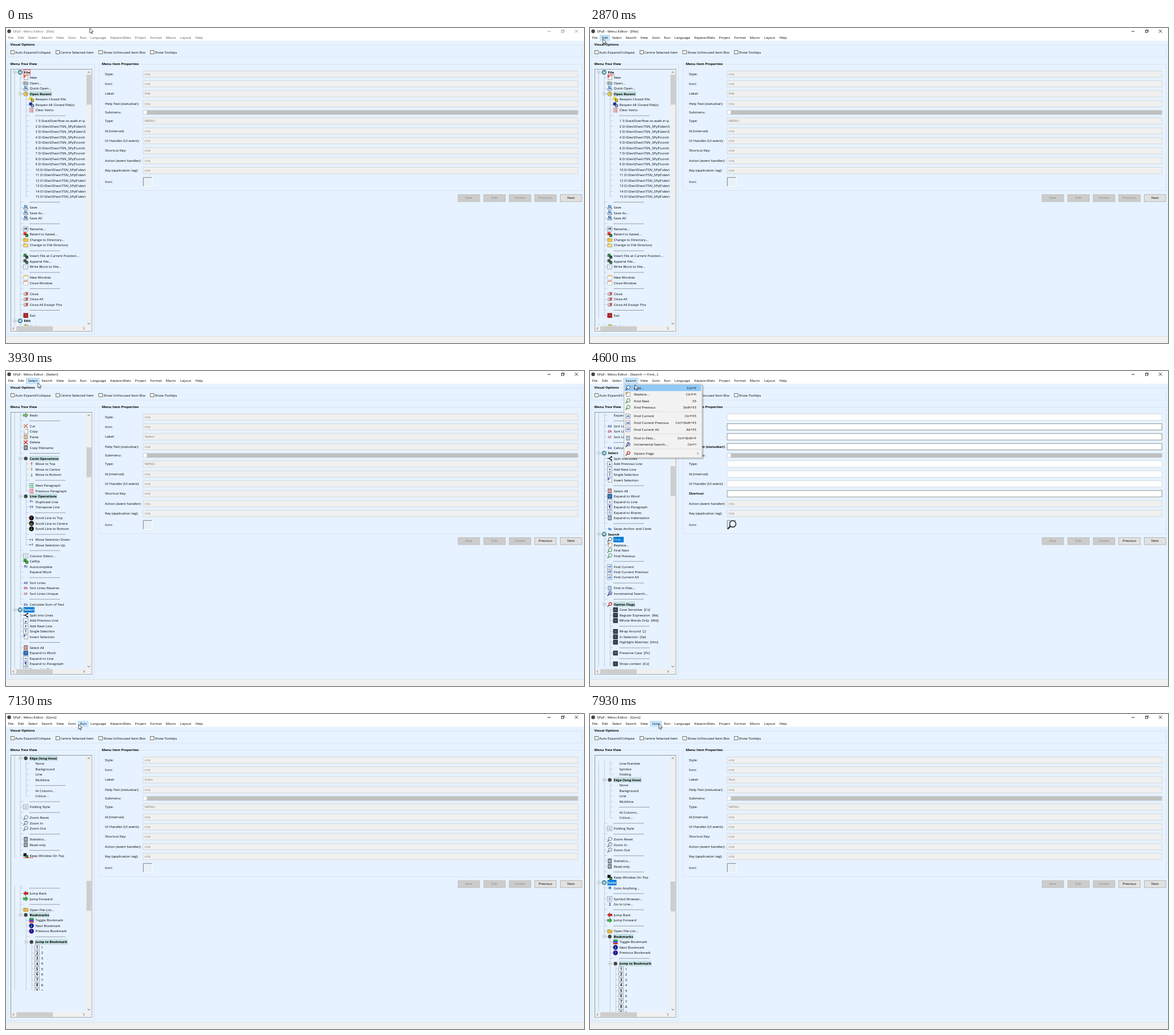
An HTML page with a canvas for the animation above (8000 ms loop, 1012 by 553 pixels).

```html
<!DOCTYPE html>
<html lang="en">
<head>
<meta charset="utf-8">
<title>Menu Editor</title>
<style>
html, body { margin: 0; width: 100%; height: 100%; overflow: hidden; background: #e6f2ff; }
canvas { display: block; width: 1012px; height: 553px; }
</style>
</head>
<body>
<canvas id="stage"></canvas>
<script>
const W = 1012, H = 553, LOOP = 8000;
const BG = '#e6f2ff', BLUE = '#0078d7';
const canvas = document.getElementById('stage');
const dpr = window.devicePixelRatio || 1;
canvas.width = W * dpr;
canvas.height = H * dpr;
const c = canvas.getContext('2d');
c.scale(dpr, dpr);

// ---- basic helpers ----
function box(x, y, w, h, fill, stroke, lw = 0.8) {
  if (fill) { c.fillStyle = fill; c.fillRect(x, y, w, h); }
  if (stroke) {
    c.strokeStyle = stroke;
    c.lineWidth = lw;
    c.strokeRect(x + lw / 2, y + lw / 2, w - lw, h - lw);
  }
}
function line(pts, col, lw = 0.8, dash = []) {
  c.strokeStyle = col;
  c.lineWidth = lw;
  c.setLineDash(dash);
  c.beginPath();
  pts.forEach(([x, y], i) => i ? c.lineTo(x, y) : c.moveTo(x, y));
  c.stroke();
  c.setLineDash([]);
}
function poly(pts, fill, stroke, lw = 0.6) {
  c.beginPath();
  pts.forEach(([x, y]) => c.lineTo(x, y));
  c.closePath();
  c.fillStyle = fill;
  c.fill();
  if (stroke) { c.strokeStyle = stroke; c.lineWidth = lw; c.stroke(); }
}
function disc(x, y, r, fill, stroke, lw = 0.8) {
  c.beginPath();
  c.arc(x, y, r, 0, 7);
  if (fill) { c.fillStyle = fill; c.fill(); }
  if (stroke) { c.strokeStyle = stroke; c.lineWidth = lw; c.stroke(); }
}
// Text is set ten times larger and scaled down, for exact advances at small sizes.
function setFont(bold, size) {
  c.font = `${bold ? 'bold ' : ''}${size * 10}px "Open Sans", "Noto Sans", "DejaVu Sans", sans-serif`;
}
function text(s, x, y, o = {}) {
  const { bold = false, col = '#000', align = 'left', size = bold ? 5.95 : 6.05 } = o;
  c.save();
  c.translate(x, y + size * 0.36);
  c.scale(0.1, 0.1);
  setFont(bold, size);
  c.fillStyle = col;
  c.textAlign = align;
  c.fillText(s, 0, 0);
  c.restore();
}
function widthOf(s, bold) {
  setFont(bold, bold ? 5.95 : 6.05);
  return c.measureText(s).width / 10;
}

// ---- icons, drawn around the origin in about 9 x 9 px ----
const ICONS = {
  page(col) { box(-3, -4, 7, 8, '#fff', '#888'); box(-4, -4, 3.5, 3.5, col); },
  doc(col) { box(-3.2, -4, 6.4, 8, '#f4f6f8', col, 1); for (const y of [-2, 0, 2]) line([[-2, y], [2, y]], col); },
  dir(col) { box(-4, -3, 4, 2, '#c89a20'); box(-4, -2, 8.4, 5.5, col, '#a98530', 0.6); },
  drive(col) { box(-2.5, -4, 5, 4, '#d9e9f8', col); box(-4, 0, 8, 3.5, '#dde3ea', '#63788f'); line([[-2, -3], [2, 1]], col, 1.2); },
  clock(col) { disc(0, 0, 3.8, col, '#7d7440'); line([[0, -2.4], [0, 0], [2, 1]], '#333'); },
  list(col) { for (const y of [-3, 0, 3]) { box(-3.5, y - 0.7, 1.6, 1.5, col); box(-1, y - 0.6, 4.6, 1.2, col); } },
  box(col, s) { box(-4.2, -4.2, 8.4, 8.4, '#edf4fb', '#778', 0.6); glyph(s, col, 6.4); },
  sq(col, s) { box(-4.2, -4.2, 8.4, 8.4, col); glyph(s, '#8a98a8', 4.5); },
  ball(col, s, ink = '#fff') { disc(0, 0, 4.2, col); glyph(s, ink, 6); },
  chr(col, s) { glyph(s, col, 7.6); },
  lens(col, s = '') {
    line([[-4, 4], [-1.2, 1]], col, 1.4);
    disc(0.8, -0.8, 3, '#eef7ff', col, 0.9);
    c.save(); c.translate(0.8, -0.8); glyph(s, col, 4.5); c.restore();
  },
  win(col) { box(-4, -4, 8, 8, '#fafafa', '#aaa', 0.6); box(-4, -4, 8, 1.6, col); },
  arrow(col, turn) {
    c.rotate(turn * Math.PI / 2);
    poly([[-4.2, 0], [0, -4], [0, -1.8], [4.2, -1.8], [4.2, 1.8], [0, 1.8], [0, 4]], col, '#444', 0.5);
  },
  cross(col) { line([[-3.4, -3], [3.4, 3.4]], col, 1.4); line([[3.4, -3.6], [-3.4, 3.4]], col, 1.4); },
  closer(col) { box(-3.4, -2, 6, 5, '#ddd', '#888'); line([[0, -3], [4, 2]], col, 1.2); line([[4, -3], [0, 2]], col, 1.2); },
  stack(colA, colB) { box(-4, -4, 5.5, 5.5, colA); box(-0.5, -0.5, 4.7, 4.7, colB, '#111', 0.6); },
  mark(col) { disc(0, 0, 3.2, col); },
  gear(col) { disc(1, -0.8, 2.4, '#fff', col, 1.4); line([[-4, 4], [-1, 1]], '#456', 1.4); },
  share(col) { line([[-4, 0], [-1, 0], [3, -3]], col, 1.2); line([[-1, 0], [3, 3]], col, 1.2); disc(3, -2.8, 1.2, col); disc(3, 2.8, 1.2, col); },
  pills() { box(-4, -4, 8, 2.4, '#1a9a2a'); box(-4, -1.2, 8, 2.4, '#2233cc'); box(-4, 1.6, 8, 2.4, '#d22'); }
};
function glyph(s, col, size) {
  if (s) text(s, 0, 0, { bold: true, col, align: 'center', size: s.length > 1 ? size * 0.72 : size });
}
function icon(spec, x, y, k = 1) {
  const [kind, ...args] = spec.split(' ');
  c.save();
  c.translate(x, y);
  c.scale(k, k);
  ICONS[kind](...args);
  c.restore();
}

// ---- tree: indent is depth, "+" a parent, "-" a separator, "@" an icon, "#" a row number ----
const PATH = String.raw`D:\Dev\D\wx\TSN_SPyE` + '\\';
const recent = Array.from({ length: 15 }, (_, i) => {
  const tail = i < 1 ? '3-StackOverflow-os-walk-in-p' : PATH + (i < 3 ? 'dev\\S' : i < 9 ? 'contr' : 'dev\\');
  return `  ${i + 1} ${tail}`;
}).join('\n');
const digits = (a, b) => Array.from({ length: b - a + 1 }, (_, i) => `   ${a + i}@box #111 ${a + i}`).join('\n');
const TREE = `#0
+File
 New@page #e8502a
 Open...@dir #8fb4dc
 Quick Open...@drive #3a78b8
 +Open Recent@clock #f3dc6a
  Reopen Closed File@stack #f0d020 #e8c840
  Reopen All Closed File(s)@stack #30309a #8aa8e8
  Clear Items@list #d03030
  -
${recent}
 -
 Save@drive #3a78b8
 Save As...@drive #3a78b8
 Save All@drive #2a5a98
 -
 Rename...@box #222 ab
 Revert to Saved...@stack #e03030 #28a040
 Change to Directory...@dir #f5c948
 Change to File Directory@dir #f3dc9a
 -
 Insert File at Current Position...@stack #2e8a4a #444c58
 Append File...@stack #555 #3e8a5a
 Write Block to File...@box #789 ::
 -
 New Window@win #f0b050
 Close Window@win #e08060
 -
 Close@closer #d02020
 Close All@closer #c02020
 Close All Except This@closer #c02020
 -
 Exit@sq #a82020 o
+Edit
 Undo@arrow #f0d040 0
 Redo@arrow #70c060 2
 -
 Cut@cross #d87050
 Copy@page #e8ebf0
 Paste@doc #a87838
 Delete@cross #d82020
 Copy Filename@doc #222
 -
 +Caret Operations@mark #444
  Move to Top@chr #e02020 ↑
  Move to Centre@chr #d89020 ↕
  Move to Bottom@chr #28a030 ↓
  -
  Next Paragraph@list #20983a
  Previous Paragraph@list #e03030
 +Line Operations@mark #444
  Duplicate Line@chr #1c3c9c T=
  Transpose Line@chr #1c3c9c TT
  -
  Scroll Line to Top@ball #111 ↑ #f33
  Scroll Line to Centre@ball #111 ↔ #fd4
  Scroll Line to Bottom@ball #111 ↓ #4d4
  -
  Move Selection Down@chr #222 =↓
  Move Selection Up@chr #222 =↑
 -
 Column Editor...@box #3a78b8 ¦¦
 Calltip@stack #28a030 #58c040
 Autocomplete@chr #1c2c5c f()
 Expand Word
 -
 Sort Lines@chr #2848a8 AZ
 Sort Lines Reverse@chr #a82848 ZA
 Sort Lines Unique@chr #a83838 U!
 -
 Calculate Sum of Text@chr #1c3c9c Σn
+Select
 Split into Lines@share #111
 Add Previous Line@box #1c3c6c ▴
 Add Next Line@box #1c3c6c ▾
 Single Selection@box #1c3c6c I
 Invert Selection@page #5878c8
 -
 Select All@doc #843838
 Expand to Word@sq #3468a8 ab
 Expand to Line@box #3468a8 =
 Expand to Paragraph@box #1c3c9c ¶
 Expand to Braces@box #3468a8 {}
 Expand to Indentation@doc #3c5878
 -
 Swap Anchor and Caret@chr #2868b8 ⇆
+Search
 Find...@lens #345
 Replace...@page #c89858
 Find Next@lens #287838
 Find Previous@lens #287838
 -
 Find Current@box #2868b8 ab
 Find Current Previous@box #2848a8 ab
 Find Current All@box #2868b8 ab
 -
 Find in Files...@doc #6888b8
 Incremental Search...@lens #1c2c6c A
 -
 +Option Flags@gear #c83838
  Case Sensitive  [Cs]@sq #343a44 Aa
  Regular Expression  [Re]@sq #343a44 .*
  Whole Words Only  [Wd]@sq #343a44 ab
  -
  Wrap Around  [;]@sq #343a44 ↺
  In Selection  [Se]@sq #343a44 =
  Highlight Matches  [Hm]@sq #343a44 =
  -
  Preserve Case  [Pc]@sq #343a44 AB
  -
  Show context  [Cx]@sq #343a44 =
#169
  Tab width: 6@box #c02828 6
  Tab width: 7@box #c02828 7
#190
  Line Number
  Symbol
  Folding
 +Edge (long lines)@mark #444
  None
  Background
  Line
  Multiline
  -
  At Column...
  Colour...
 -
 Folding Style@box #556 ||
 -
 Zoom Reset@lens #567
 Zoom In@lens #567 +
 Zoom Out@lens #567 -
 -
 Statistics...@doc #343a44
 Read-only@doc #343a44
 -
 Keep Window On Top@stack #111 #28a030
+Goto
 Goto Anything...@chr #2878a8 ✱
 -
 Symbol Browser...@box #3868a8 {}
 Go to Line...@chr #1c3c9c ↧
 -
 Jump Back@arrow #e02020 0
 Jump Forward@arrow #28c030 2
 -
 Open File List...@dir #e8b848
 +Bookmarks@mark #444
  Toggle Bookmark@pills
  Next Bookmark@ball #1a1a9c ↓ #4e4
  Previous Bookmark@ball #1a1a9c ↑ #f44
  -
  +Jump to Bookmark@mark #444
${digits(1, 10)}
  Clear Bookmarks@cross #d82020
+Run
 Run`;

const rows = [];
let at = 0;
for (const s of TREE.split('\n')) {
  if (s[0] === '#') { at = +s.slice(1); continue; }
  const body = s.trimStart(), parent = body[0] === '+';
  const [label, ic] = body.slice(parent ? 1 : 0).split('@');
  rows[at++] = { depth: s.length - body.length, parent, label, ic };
}
const PITCH = 9.487, TOP = 77.7, GOTO = 212;
const rowOf = name => rows.findIndex(r => r && r.parent && r.label === name);

// True when a sibling at this level follows.
function continues(i, level) {
  let j = i + 1;
  while (rows[j] && rows[j].depth > level) j++;
  return !rows[j] || rows[j].depth === level;
}
function drawRow(i, y, s) {
  const r = rows[i], half = PITCH / 2, col = '#b4bcc6';
  for (let l = 0; l <= r.depth; l++) {
    const x = 15.2 + 10 * l, more = continues(i, l);
    if (l === r.depth) line([[x, i ? y - half : y], [x, more ? y + half : y]], col, 0.7);
    else if (more) line([[x, y - half], [x, y + half]], col, 0.7);
  }
  const x = 15.2 + 10 * r.depth, tx = x + 16.3;
  line([[x, y], [x + 5, y]], col, 0.7);
  if (r.parent) {
    box(x - 2.6, y - 2.6, 5.2, 5.2, '#f6faff', '#a4adb8', 0.6);
    line([[x - 1.4, y], [x + 1.4, y]], '#456', 0.7);
  }
  if (r.label === '-') {
    line([[tx, y + 0.4], [tx + 52.4, y + 0.4]], '#333', 0.7, [1.7, 0.96]);
    return;
  }
  if (r.parent && !r.depth) {
    disc(x + 9.6, y, 4.2, '#4a8797');
    text('M', x + 9.6, y, { bold: true, size: 5.6, align: 'center', col: '#fff' });
  } else if (r.ic) icon(r.ic, x + 9.4, y);
  const w = widthOf(r.label, r.parent) + 1.4, chosen = i === s.sel;
  if (chosen) box(tx - 0.8, y - 4.7, w, PITCH, BLUE);
  else if (r.parent && r.depth) box(tx - 0.6, y - 4.6, w, 9.1, '#c2dde0');
  if (i === s.framed) box(tx - 1, y - 4.7, w + 0.4, PITCH, '#f4f4f4', '#f03030');
  text(r.label, tx, y, { bold: r.parent, col: chosen ? '#fff' : '#000' });
}
function chevron(x, y, dx, dy) {
  line([[x - dx - dy * 2, y - dy - dx * 2], [x + dx, y + dy], [x - dx + dy * 2, y - dy + dx * 2]], '#444', 0.9);
}
function drawTree(s) {
  box(8, 72, 142.5, 461, BG, '#7d858f');
  c.save();
  c.beginPath();
  c.rect(9, 73, 132, 450);
  c.clip();
  for (let k = 0; k < 48; k++) if (rows[s.top + k]) drawRow(s.top + k, TOP + k * PITCH, s);
  for (const [a, b] of s.blank) box(9, a, 132, b - a, BG);
  if (s.red) line([[30.5, s.red[0]], [s.red[1], s.red[0]]], '#f03030', 0.9);
  c.restore();
  box(141, 73, 8.7, 450, '#f0f0f0');
  box(9, 523, 140.7, 9.2, '#f0f0f0');
  box(141, s.thumb, 8.2, 52.5, '#cdcdcd');
  box(18, 523.6, 64, 8, '#cdcdcd');
  chevron(145, 77.8, 0, -1);
  chevron(145, 518.8, 0, 1);
  chevron(13, 527.5, -1, 0);
  chevron(136.5, 527.5, 1, 0);
}

// ---- properties ----
const FIELDS = [['Style:', 81], ['Icon:', 98], ['Label:', 115.5], ['Help Text (statusbar):', 132.8],
  ['Type:', 163.3], ['Id (internal):', 180.8], ['UI Handler (UI event):', 198], ['Shortcut Key:', 215.5],
  ['Action (event handler):', 232.8], ['Key (application tag):', 250.2]];
const FIND = ['', 'find', 'Find...', 'Find text dialog in search panel', 'NORMAL', 'WindowIDRef: -31846',
  'Doc', 'Ctrl+F', 'tlw.set_search_mode', 'SCH_FND'];
const EDITABLE = [1, 2, 3, 7];

function drawProps(s) {
  FIELDS.forEach(([name, y], i) => {
    const edit = s.mode !== 'menu' && EDITABLE.includes(i);
    const white = edit || (s.mode === 'blank' && i < 8);
    let val = 'n/a';
    if (s.mode === 'menu') val = i === 2 ? s.label : i === 4 ? 'MENU' : val;
    else if (s.mode === 'find') val = FIND[i];
    else if (i < 8) val = '';
    text(s.mode === 'blank' && i === 7 ? 'Shortcut' : name, 173.3, y - 0.2, { bold: edit });
    box(239.7, y - 6, 762, 12, white ? '#fff' : '#f0f0f0', edit ? '#7a7a7a' : '#cfd3d8');
    text(val, 243, y - 0.2, { col: edit ? '#000' : '#747474' });
  });
  text('Submenu:', 173.3, 148);
  box(239.7, 144.3, 762, 7.8, '#c0c0c0');
  box(240.5, 145, 6, 6.4, '#fff');
  text('Icon:', 173.3, 270);
  box(240, 262, 16.5, 16.5, '#e9f1f8');
  line([[256, 262.4], [240.4, 262.4], [240.4, 278]], '#777', 0.9);
  line([[256.2, 262], [256.2, 278.2], [240, 278.2]], '#fff', 0.9);
  if (s.mode !== 'menu') icon('lens #2c3a48', 248.5, 270, 1.85);
}

// ---- window ----
const MENUS = [['File', 3.7], ['Edit', 21], ['Select', 38.7], ['Search', 62.3], ['View', 88], ['Goto', 108.7],
  ['Run', 129.7], ['Language', 148], ['KeywordSets', 182.7], ['Project', 225.8], ['Format', 252.5],
  ['Macro', 279.8], ['Layout', 305], ['Help', 331.5]];
const CHECKS = [['Auto Expand/Collapse', 8], ['Centre Selected Item', 87], ['Show Unfocused Item Box', 162.3], ['Show Tooltips', 252.5]];
const BUTTONS = [['New', 791], ['Edit', 836], ['Delete', 880.7], ['Previous', 925.3], ['Next', 970]];

function group(name, x, y, w, h) {
  box(x, y, w, h, null, '#d6e0ea');
  box(x + 3.5, y - 3, widthOf(name, true) + 2, 6, BG);
  text(name, x + 4.7, y, { bold: true });
}
function drawWindow(s, hover) {
  box(0, 0, W, H, BG);
  box(0, 0, W, 22.4, '#fff');
  const ink = s.active ? '#000' : '#8a8a8a';
  disc(5.5, 5.8, 3.2, '#444');
  text(`SPyE - Menu Editor - [${s.title}]`, 12.2, 5.8, { col: s.active ? '#000' : '#666' });
  line([[948, 6], [953.6, 6]], ink);
  box(972, 4, 4.4, 4.4, null, ink, 0.7);
  line([[973.4, 4], [973.4, 3], [977.4, 3], [977.4, 7], [976.4, 7]], ink, 0.6);
  line([[996, 3], [1001.4, 8.4]], ink);
  line([[1001.4, 3], [996, 8.4]], ink);
  MENUS.forEach(([name, x], i) => {
    if (i === hover) box(x - 3.8, 12, MENUS[i + 1][1] - x, 10.3, '#cce8ff', '#99d1ff', 0.6);
    text(name, x, 17, { col: s.active ? '#000' : '#555' });
  });
  group('Visual Options', 2.7, 29.3, 1006.5, 22);
  for (const [name, x] of CHECKS) {
    box(x, 39, 6.8, 6.8, '#fff', '#333', 0.7);
    text(name, x + 8.1, 42.4);
  }
  group('Menu Tree View', 2.7, 63, 152.5, 475.5);
  group('Menu Item Properties', 163, 63, 846.2, 223);
  drawTree(s);
  drawProps(s);
  BUTTONS.forEach(([name, x], i) => {
    const on = i === 4 || (i === 3 && s.prev);
    box(x, 292, 38.6, 13.2, on ? '#e1e1e1' : '#ccc', on ? '#adadad' : '#bfbfbf');
    text(name, x + 19.3, 298.3, { align: 'center', col: on ? '#000' : '#8a8a8a' });
  });
  box(0, 541.3, W, 12, '#f0f0f0');
  line([[0, 541.5], [W, 541.5]], '#d7d7d7', 0.6);
}

// ---- pop-up menu: label, y, shortcut ----
const POPUP = [['Find...', 29.5, 'Ctrl+F'], ['Replace...', 41, 'Ctrl+H'], ['Find Next', 52.5, 'F3'],
  ['Find Previous', 64, 'Shift+F3'], ['Find Current', 79.3, 'Ctrl+F3'], ['Find Current Previous', 91, 'Ctrl+Shift+F3'],
  ['Find Current All', 102.5, 'Alt+F3'], ['Find in Files...', 117.8, 'Ctrl+Shift+F'],
  ['Incremental Search...', 129.3, 'Ctrl+I'], ['Option Flags', 144.6, '']];
function drawPopup(lit) {
  box(61, 25, 138, 130, 'rgba(0,0,0,.18)');
  box(59, 22.6, 137.5, 130, '#f2f2f2', '#b0b0b0');
  if (lit) box(60.8, 24, 133.6, 11.2, '#91c9f7');
  for (const [name, y, key] of POPUP) {
    const r = rows.find(q => q && q.label === name);
    icon(r.ic, 66.5, y);
    text(name, 77, y);
    text(key, 186, y, { align: 'right' });
  }
  for (const y of [71.6, 110.2, 137]) line([[74, y], [194, y]], '#d0d0d0', 0.6);
  chevron(188.5, 144.6, 0.9, 0);
}

function drawCursor(x, y) {
  const shape = [[0, 0], [0, 8.6], [2, 6.9], [3.4, 10], [4.7, 9.4], [3.4, 6.4], [6, 6.2]];
  poly(shape.map(([a, b]) => [x + a + 0.3, y + b + 0.2]), '#fff', '#111', 0.7);
}

// ---- timeline in ticks of 1/15 s; each entry changes part of the state ----
const STATES = [
  [0, { title: 'File', label: 'File', mode: 'menu', top: 0, thumb: 82, framed: 0, sel: -1, blank: [] }],
  [33, { active: true }],
  [34, { framed: -1, red: [82, 43], blank: [[509.4, 518.9]] }],
  [45, { title: 'Edit', red: null, blank: [], sel: rowOf('Edit') }],
  [46, { prev: true }],
  [47, { label: 'Edit' }],
  [49, { title: 'Select', top: 48, thumb: 134, sel: rowOf('Select') }],
  [53, { label: 'Select' }],
  [61, { title: 'Search', top: 77, thumb: 167, sel: rowOf('Search') }],
  [63, { label: 'Search' }],
  [67, { popup: true }],
  [68, { title: 'Search -> Find...', sel: rowOf('Search') + 1, lit: true }],
  [69, { mode: 'blank' }],
  [71, { mode: 'find' }],
  [89, { popup: false }],
  [93, { top: 169, thumb: 267.5, sel: -1, blank: [[92, 523]] }],
  [96, { title: 'Goto', top: GOTO - 23, thumb: 293.5, sel: GOTO, blank: [] }],
  [98, { mode: 'menu', label: 'Goto' }],
  [107, { top: GOTO - 19, thumb: 293, sel: -1, red: [252.3, 48], blank: [[253, 300.5], [485.4, 523]] }],
  [109, { title: 'Run', sel: rowOf('Run'), thumb: 297, red: null, blank: [] }],
  [111, { label: 'Run' }],
  [118, { title: 'Goto', top: GOTO - 23, thumb: 294, sel: GOTO }]
];
const CURSOR = [[0, 146.5, 0], [6, 146.5, 0], [7, 151, 4], [8, 144.3, 5], [11, 144.3, 5], [20, 10.3, 21], [22, 10.3, 21],
  [23, 9.3, 21], [25, 9.3, 21], [27, 9.3, 19], [42, 9.3, 19], [43, 22.3, 19], [51, 51.3, 21], [58, 51.3, 21],
  [63, 73, 20], [66, 73, 20], [69, 78.3, 24], [73, 83.3, 24], [77, 83.3, 24], [80, 102, 25], [88, 102, 25],
  [89, 102.5, 21], [94, 105.2, 20], [101, 118.3, 17], [102, 121, 17], [104, 121, 17], [107, 126.8, 18],
  [112, 131, 18], [114, 131, 18], [119, 120.2, 17]];

function cursorAt(n) {
  const i = CURSOR.findIndex(k => k[0] >= n);
  if (i < 1) return CURSOR[i ? CURSOR.length - 1 : 0].slice(1);
  const [a, ax, ay] = CURSOR[i - 1], [b, bx, by] = CURSOR[i], p = (n - a) / (b - a);
  return [ax + (bx - ax) * p, ay + (by - ay) * p];
}
function draw(n) {
  const s = Object.assign({}, ...STATES.filter(e => e[0] <= n).map(e => e[1]));
  const [x, y] = cursorAt(n);
  let hover = -1;
  if (s.popup) hover = 3;
  else if (s.active && y < 22) hover = MENUS.findLastIndex(m => m[1] - 3.8 <= x);
  drawWindow(s, hover);
  if (s.popup) drawPopup(s.lit);
  drawCursor(x, y);
}

let shown = -1;
function tick() {
  const n = Math.floor((performance.now() % LOOP) * 0.015 + 0.1);
  if (n !== shown) draw(Math.min(shown = n, 119));
  requestAnimationFrame(tick);
}
tick();
</script>
</body>
</html>
```
